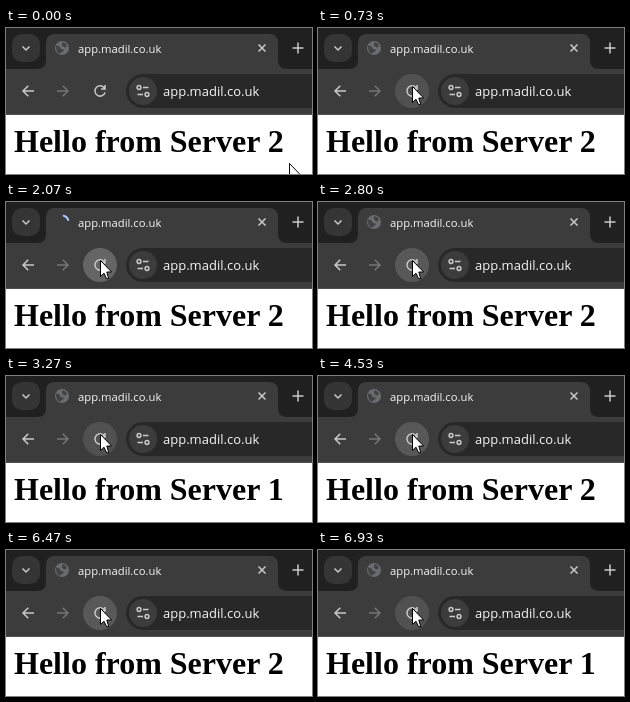
Write an HTML page that moves like this. It is 306 px wide and 146 px high and loops after 8.07 s.

```html
<!DOCTYPE html>
<html lang="en">
<head>
<meta charset="utf-8">
<title>Reload</title>
<style>
  html, body { margin: 0; height: 100%; overflow: hidden; background: #fff; }
  svg { display: block; width: 306px; height: 146px; }
  text { font-family: "Open Sans", "Noto Sans", sans-serif; fill: #f6f6f6; }
  .heading { font: bold 32px "Liberation Serif", "Times New Roman", serif; fill: #000; }
  .line { fill: none; stroke: #c9c9c9; stroke-width: 1.5; }
</style>
</head>
<body>
<svg viewBox="0 0 306 146">
  <!-- tab strip and toolbar -->
  <rect width="306" height="87" fill="#202020"/>
  <rect x="6" y="6" width="28" height="28" rx="10" fill="#353535"/>
  <path class="line" d="M16.5 18.500 20 22l3.500-3.500"/>
  <path d="M0 41H306V87H0ZM31 41q9 0 9-9V15q0-9 9-9H263q9 0 9 9V32q0 9 9 9Z" fill="#3c3c3c"/>
  <path class="line" d="M252.500 16.500l7 7m0-7-7 7M292 14.500v11m-5.500-5.500h11"/>

  <!-- favicon or loading spinner -->
  <g id="globe">
    <circle cx="56" cy="20" r="7" fill="#6a6d70"/>
    <path d="M50 17.500q3.500 0 4 2t3 2-1 2.500-2 2q-4.500-2-4-8.500ZM56 14.500q4-.5 5 4l-2.500 1-2.500-2Z" fill="#414345"/>
  </g>
  <path id="spinner" fill="none" stroke="#a8c7fa" stroke-width="2" stroke-linecap="round"/>
  <text x="72" y="24.500" font-size="11.250">app.madil.co.uk</text>

  <!-- navigation buttons -->
  <path class="line" d="M28 63H17m5.300-5.300L17 63l5.300 5.300"/>
  <path class="line" d="M51 63H62m-5.300-5.300L62 63l-5.300 5.300" style="stroke:#747474"/>
  <circle id="hover" cx="94" cy="63" r="17" fill="#fff"/>
  <path class="line" d="M98.600 60.200A5.200 5.200 0 1 0 99.100 64.500M99 57v4H95"/>

  <!-- address field -->
  <path d="M306 46H137a17 17 0 0 0 0 34H306Z" fill="#282828"/>
  <circle cx="137" cy="63" r="14" fill="#3c3c3c"/>
  <g class="line">
    <circle cx="133" cy="59.500" r="1.900"/>
    <circle cx="141" cy="66.500" r="1.900"/>
    <path d="M137 59.500H142.500M131.500 66.500h5.500"/>
  </g>
  <text x="157" y="67.500" font-size="13">app.madil.co.uk</text>

  <!-- page -->
  <rect y="86" width="306" height="1" fill="#505050"/>
  <rect y="87" width="306" height="59" fill="#fff"/>
  <text class="heading" id="heading" x="8" y="124"></text>

  <g id="tooltip">
    <rect x="104.500" y="74.500" width="104" height="24" rx="3" fill="#2b2b2b" stroke="#4a4a4a"/>
    <text x="112" y="91" font-size="11.250">Reload this page</text>
  </g>
  <path id="cursor" d="M.5.500V16.500L4 13.200 6.500 18.600H8.700L6.800 12H11.600Z" fill="#fff" stroke="#000"/>
</svg>
<script>
const LOOP = 8070, FPS = 15;
// click start and load end, in steps of 1/15 s, and the server that answers
const clicks = [[26, 34, 2], [42, 49, 1], [55, 62, 2], [68, 75, 1], [83, 90, 2], [97, 104, 1]];
const tooltips = [[19, 26], [37, 42]];

const [globe, spinner, hover, heading, tooltip, cursor] =
  ["globe", "spinner", "hover", "heading", "tooltip", "cursor"].map(id => document.getElementById(id));
const clamp = v => Math.min(1, Math.max(0, v));
const show = (node, on) => node.style.display = on ? "" : "none";

function arc(start, sweep) {
  const point = a => `${56 + 6.5 * Math.cos(a)} ${20 + 6.5 * Math.sin(a)}`;
  return `M${point(start)}A6.500 6.500 0 0 0 ${point(start - sweep)}`;
}

function draw(ms) {
  const step = Math.floor(ms * FPS / 1000 + 0.06);
  const u = clamp(step / 11), ease = u * u * (3 - 2 * u);
  const x = Math.round(283 - 189 * ease), y = Math.round(135 - 77 * ease);
  cursor.setAttribute("transform", `translate(${x} ${y})`);

  let server = 2, loading = false, ripple = 0;
  for (const [start, end, answer] of clicks) {
    if (step >= end - 1) server = answer;
    if (step < start || step >= end) continue;
    ripple = Math.min(clamp((step - start + 1) / 3), clamp((end - step) / 3));
    const spin = step - start - 4;
    if (spin >= 0) {
      loading = true;
      spinner.setAttribute("d", arc(0.2 - 0.5 * spin, 1));
    }
  }
  show(globe, !loading);
  show(spinner, loading);
  show(tooltip, tooltips.some(([from, to]) => step >= from && step < to));
  hover.setAttribute("opacity", 0.11 * clamp((step - 8) / 3) + 0.1 * ripple);
  heading.textContent = "Hello from Server " + server;
}

function tick() {
  draw(performance.now() % LOOP);
  requestAnimationFrame(tick);
}
tick();
</script>
</body>
</html>
```
